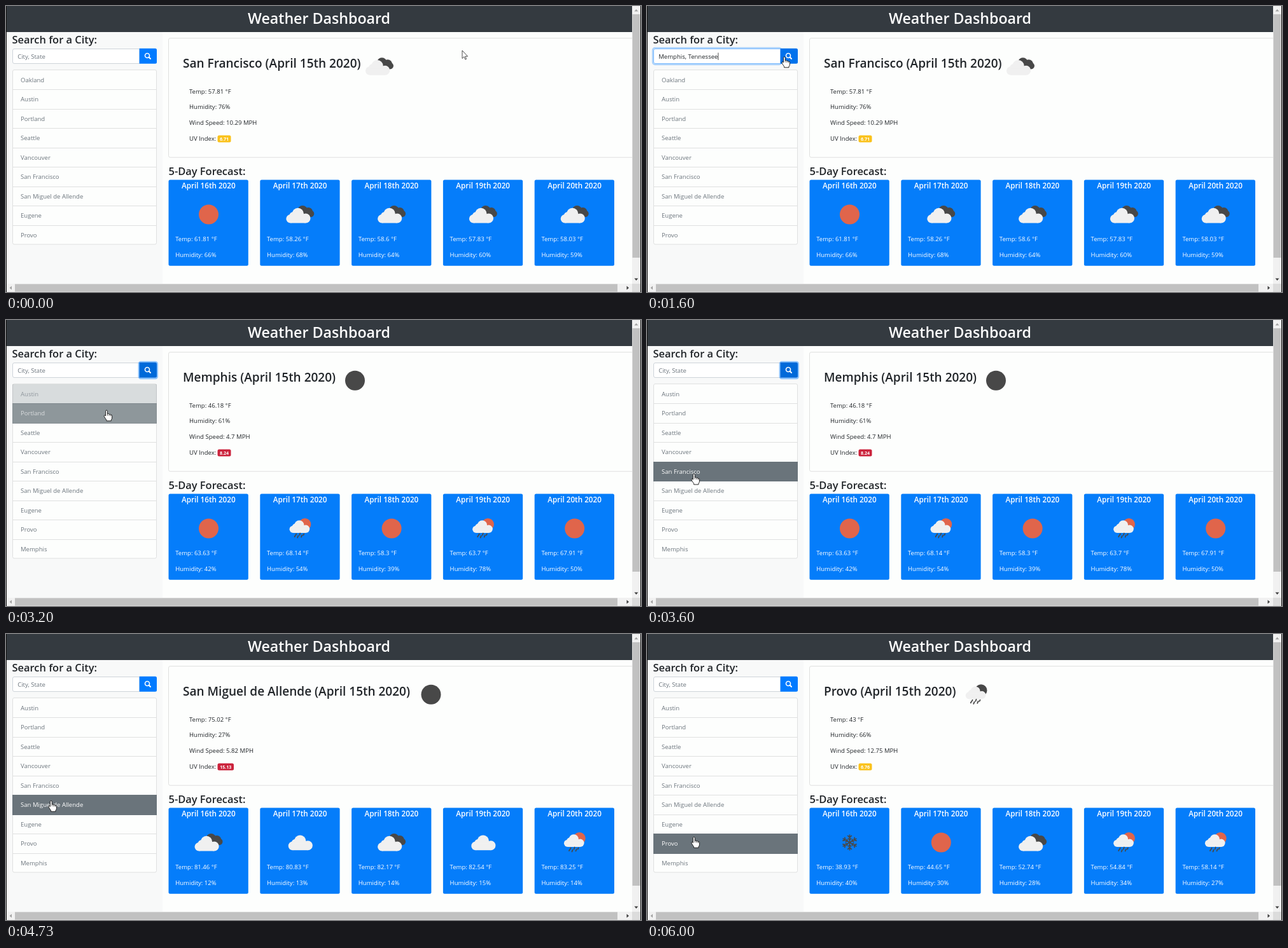
Recreate the animation shown at these times as an HTML page. Size 998 px wide and 450 px high, loop 6060 ms.

```html
<!DOCTYPE html>
<html lang="en">
<head>
<meta charset="utf-8">
<title>Weather Dashboard</title>
<style>
html, body { margin: 0; width: 100%; height: 100%; overflow: hidden; background: #fdfefd; }
svg { display: block; width: 998px; height: 450px; }
text { font: 9.55px "Open Sans", "Noto Sans", sans-serif; fill: #212529; white-space: pre; }
.h1 { font-size: 23.2px; font-weight: 600; fill: #fff; text-anchor: middle; }
.h2 { font-size: 19.05px; font-weight: 600; }
.h3 { font-size: 16.45px; font-weight: 600; }
.day { font-size: 11.7px; font-weight: 600; fill: #fff; text-anchor: middle; }
.light { fill: #fff; }
.muted { fill: #6c757d; }
.badge { font-size: 7.1px; font-weight: 700; fill: #fff; text-anchor: middle; }
</style>
</head>
<body>
<svg viewBox="0 0 998 450">
  <defs>
    <g id="cloud">
      <circle cx="-15.2" cy="6.7" r="6.8"/><circle cx="-11" cy="2" r="6"/><circle cx="-3.5" cy="-1" r="9.2"/><circle cx="8.7" cy="6" r="7.5"/>
      <rect x="-15" y="3" width="23.5" height="10.5"/>
    </g>
    <g id="clear"><circle r="15.5"/></g>
    <g id="scattered"><use href="#cloud" x="3.4" y="-1.3" fill="#f0f0f0"/></g>
    <g id="broken">
      <g fill="#484848"><circle cx="3.8" cy="-6.2" r="7.8"/><circle cx="12.8" cy="-4" r="7"/><circle cx="16.8" cy="-1.2" r="5.2"/><rect x="2" y="-6" width="14.8" height="10"/></g>
      <use href="#cloud" fill="#f0f0f0"/>
    </g>
    <g id="rain">
      <circle cx="7.5" cy="-6.5" r="9.5"/>
      <use href="#cloud" transform="translate(1.5 -4.2) scale(.83)" fill="#f0f0f0"/>
      <path d="M-6 8.5l-1 2M0 7.5l-1 3M6 8.5l-1 2M-8 11.5l-.7 1.6M-3 11.5l-1.2 3M3 10.5l-1.2 3" stroke="#484848" stroke-width="1.8" stroke-linecap="round"/>
    </g>
    <g id="snow" fill="none" stroke="#484848" stroke-width="1.7"></g>
    <g id="hand"><path d="M-1.6 1.2Q-1.6 0-.2 0 1.2 0 1.2 1.3V5.6Q3.6 5 3.9 6.4 6 5.8 6.3 7.2 8.4 6.8 8.4 8.8V12Q8.4 14 7 15V16.8H-.4V15.2Q-2.6 12.4-4 9.6-4.4 8-3 7.8-2.2 8-1.6 9Z" fill="#fff" stroke="#111" stroke-width=".9"/><path d="M1.2 5.6V8.6M3.9 6.4V9M6.3 7.2V9.4" stroke="#111" stroke-width=".7"/></g>
    <g id="arrow"><path d="M0 0V12.5L2.9 9.8 4.9 14.2 6.6 13.4 4.7 9.2H8.6Z" fill="#fff" stroke="#222" stroke-width=".8"/></g>
    <g id="beam"><path d="M-2-5H2M0-5V5M-2 5H2" fill="none" stroke="#222"/></g>
  </defs>

  <rect width="998" height="450" fill="#fdfefd"/>
  <rect y="41" width="246" height="396" fill="#f8f9f9"/>
  <rect width="984" height="41" fill="#343a40"/>
  <text class="h1" x="492" y="28">Weather Dashboard</text>
  <text class="h3" x="9.5" y="59">Search for a City:</text>

  <rect id="inputRing" x="9" y="66" width="202" height="26" rx="3.5" fill="none" stroke="#007bff" stroke-opacity=".3" stroke-width="2.4"/>
  <path id="input" d="M210 67.5H13Q10.5 67.5 10.5 70V88Q10.5 90.5 13 90.5H210Z" fill="#fff"/>
  <rect id="btnRing" x="208.8" y="66" width="29" height="26" rx="3" fill="none" stroke="#268fff" stroke-opacity=".5" stroke-width="2.4"/>
  <path id="btn" d="M209.6 66.8H234.5Q237 66.8 237 69.3V88.3Q237 90.8 234.5 90.8H209.6Z"/>
  <g fill="none" stroke="#fff" stroke-linecap="round"><circle cx="222" cy="78" r="3.5" stroke-width="1.6"/><path d="M224.8 80.8L227 83" stroke-width="2"/></g>
  <text id="query" x="18.2" y="82.6"></text>
  <path id="caret" d="M0 73.5V85" stroke="#222" stroke-width=".8"/>

  <g id="list"></g>
  <rect x="255.5" y="50.7" width="740" height="187.5" rx="2.5" fill="none" stroke="#dfe0df"/>
  <text class="h3" x="255.5" y="265.5">5-Day Forecast:</text>
  <g id="weather"></g>

  <rect x="984" width="14" height="437" fill="#f1f1f1"/>
  <rect x="984.5" y="13" width="12" height="383" fill="#c1c1c1"/>
  <rect y="437" width="984" height="13" fill="#f1f1f1"/>
  <rect x="14" y="437.5" width="947" height="12" fill="#c1c1c1"/>
  <rect x="984" y="437" width="14" height="13" fill="#dcdcdc"/>
  <path d="M987.5 8.5L990.5 5 993.5 8.5ZM9 440.5L5.5 443.5 9 446.5Z" fill="#a3a3a3"/>
  <path d="M987.5 428.5H993.5L990.5 432ZM975.5 440.5L979 443.5 975.5 446.5Z" fill="#404040"/>
  <path d="M.5 0V450M997.5 0V450" stroke="#111"/>
  <use id="cursor"/>
</svg>
<script>
const LOOP = 6060, ROW_TOP = 101, ROW_H = 30.45;
const SUN = '#e0654b', DARK = '#484848';
const $ = id => document.getElementById(id);

const towns = ['Oakland', 'Austin', 'Portland', 'Seattle', 'Vancouver', 'San Francisco',
  'San Miguel de Allende', 'Eugene', 'Provo', 'Memphis'];

// days: icon, temperature, humidity
const scenes = [
  { at: 0, first: 0, city: 'San Francisco', icon: 'broken', iconX: 587, temp: '57.81', hum: 76, wind: '10.29', uv: '6.71',
    days: ['clear 61.81 66', 'broken 58.26 68', 'broken 58.6 64', 'broken 57.83 60', 'broken 58.03 59'] },
  { at: 2130, first: 1, city: 'Memphis', icon: 'clear', iconX: 548.5, temp: '46.18', hum: 61, wind: '4.7', uv: '8.24',
    days: ['clear 63.63 42', 'rain 68.14 54', 'clear 58.3 39', 'rain 63.7 78', 'clear 67.91 50'] },
  { at: 4130, first: 1, city: 'San Miguel de Allende', icon: 'clear', iconX: 668, temp: '75.02', hum: 27, wind: '5.82', uv: '15.13',
    days: ['broken 81.46 12', 'scattered 80.83 13', 'broken 82.17 14', 'scattered 82.54 15', 'rain 83.25 14'] },
  { at: 5860, first: 1, city: 'Provo', icon: 'rain', iconX: 517.5, temp: '43', hum: 66, wind: '12.75', uv: '6.76',
    days: ['snow 38.93 40', 'clear 44.65 30', 'broken 52.74 28', 'rain 54.84 34', 'rain 58.14 27'] }
];

// time, x, y, eased
const path = [
  [0, 717, 70], [60, 717, 70], [700, 185, 78, 1], [1460, 185, 78], [1600, 216, 80], [1800, 227, 78, 1],
  [2860, 227, 78], [3150, 170, 130], [3545, 79, 223], [3600, 74, 242], [3800, 71, 262.5],
  [4730, 71, 262.5], [5330, 74, 321.5, 1], [5860, 74, 321.5], [6000, 74, 319.5], [LOOP, 74, 319.5]
];
const typing = [[1130, 4], [1200, 8], [1260, 11], [1330, 15], [1460, 18]];
const FOCUS = 660, SUBMIT = 1900, PICK = 3930;

const clamp = v => Math.max(0, Math.min(1, v));
const mix = (a, b, k) => `rgb(${a.map((v, i) => Math.round(v + (b[i] - v) * k))})`;
const text = (x, y, s, cls = '') => `<text class="${cls}" x="${x}" y="${y}">${s}</text>`;
const icon = (name, x, y, fill) => `<use href="#${name}" x="${x}" y="${y}" fill="${fill}"/>`;

$('snow').innerHTML = [0, 60, 120, 180, 240, 300].map(a =>
  `<path transform="rotate(${a})" d="M0 0V-12.5M-3.3-11L0-7.7 3.3-11M-2.5-6.5L0-4 2.5-6.5"/>`).join('');

function drawWeather(s) {
  const w = s.uv.length > 4 ? 25.5 : 21;
  let out = text(278, 97, `${s.city} (April 15th 2020)`, 'h2') + icon(s.icon, s.iconX, 95.3, DARK);
  [`Temp: ${s.temp} °F`, `Humidity: ${s.hum}%`, `Wind Speed: ${s.wind} MPH`, 'UV Index:']
    .forEach((line, i) => out += text(288, 137.5 + i * 24.8, line));
  out += `<rect x="332.5" y="203.5" width="${w}" height="11" rx="2.5" fill="${+s.uv < 8 ? '#fac21c' : '#cb233c'}"/>`;
  out += text(332.5 + w / 2, 211.7, s.uv, 'badge');
  s.days.forEach((day, i) => {
    const [name, temp, hum] = day.split(' '), x = 255.5 + i * 143.8;
    out += `<rect x="${x}" y="273.5" width="125.3" height="135.3" rx="2.5" fill="#057dfa"/>`
      + text(x + 62.8, 287, `April ${16 + i}th 2020`, 'day') + icon(name, x + 63, 328, SUN)
      + text(x + 10.7, 370.2, `Temp: ${temp} °F`, 'light') + text(x + 10.7, 395, `Humidity: ${hum}%`, 'light');
  });
  $('weather').innerHTML = out;
}

function drawList(s) {
  const names = towns.slice(s.first, s.first + 9);
  const edge = i => Math.round(ROW_TOP + i * ROW_H);
  $('list').innerHTML = '<rect x="10.5" y="100.5" width="226" height="274.5" rx="2.5" fill="#fdfefd" stroke="#dfe0e0"/>'
    + names.slice(1).map((_, i) => `<path d="M10 ${edge(i + 1) + .5}H237" stroke="#dfe0e0"/>`).join('')
    + names.map((name, i) =>
      `<rect class="row" x="10" y="${edge(i)}" width="227" height="${edge(i + 1) + 1 - edge(i)}" fill="#6a747b"/>`
      + `<text class="town" x="23" y="${ROW_TOP + i * ROW_H + 19}">${name}</text>`).join('');
}

function pointer(t) {
  const i = Math.max(1, path.findIndex(p => p[0] >= t));
  const [t0, x0, y0] = path[i - 1], [t1, x1, y1, eased] = path[i];
  let k = clamp((t - t0) / (t1 - t0));
  if (eased) k = k * k * (3 - 2 * k);
  return [x0 + (x1 - x0) * k, y0 + (y1 - y0) * k];
}

function hit(t) {
  const [x, y] = pointer(Math.max(0, t));
  if (x < 10 || x > 237) return null;
  if (y > 67 && y < 91) return x < 210 ? 'input' : 'btn';
  const row = Math.floor((y - ROW_TOP) / ROW_H);
  return row >= 0 && row < 9 ? row : null;
}

// Share of the last 60 ms spent over a part gives its hover fade.
function hover(t) {
  const share = {};
  for (let k = 0; k < 12; k++) {
    const part = hit(t - k * 5);
    share[part] = (share[part] || 0) + 1 / 12;
  }
  return part => share[part] || 0;
}

let shown;
function render(t) {
  const scene = scenes.filter(s => s.at <= t).pop();
  if (scene !== shown) {
    shown = scene;
    drawWeather(scene);
    drawList(scene);
  }

  const over = hover(t);
  const fade = (from, to) => clamp((t - from) / 120) * (1 - clamp((t - to) / 120));
  const inFocus = fade(FOCUS, SUBMIT), btnFocus = fade(SUBMIT, PICK);
  $('inputRing').style.opacity = inFocus;
  $('input').setAttribute('stroke', mix([206, 212, 218], [128, 189, 255], inFocus));
  $('btnRing').style.opacity = btnFocus;
  $('btn').setAttribute('fill', mix([0, 123, 255], [0, 105, 217], Math.max(over('btn'), btnFocus)));

  const chars = typing.reduce((n, [at, count]) => t >= at ? count : n, 0);
  const typed = t < scenes[1].at ? 'Memphis, Tennessee'.slice(0, chars) : '';
  const query = $('query');
  query.textContent = typed || 'City, State';
  query.setAttribute('class', typed ? '' : 'muted');
  const caretX = typed ? 18.7 + query.getComputedTextLength() : 18;
  $('caret').setAttribute('transform', `translate(${caretX} 0)`);
  $('caret').style.opacity = t > FOCUS && t < SUBMIT ? 1 : 0;

  const labels = document.querySelectorAll('.town');
  document.querySelectorAll('.row').forEach((row, i) => {
    row.style.opacity = over(i);
    labels[i].style.fill = mix([108, 117, 125], [255, 255, 255], over(i));
  });

  const part = hit(t), [x, y] = pointer(t);
  $('cursor').setAttribute('href', part === null ? '#arrow' : part === 'input' ? '#beam' : '#hand');
  $('cursor').setAttribute('transform', `translate(${x} ${y})`);
}

const start = performance.now();
function tick() {
  render((performance.now() - start) % LOOP);
  requestAnimationFrame(tick);
}
tick();
</script>
</body>
</html>
```
